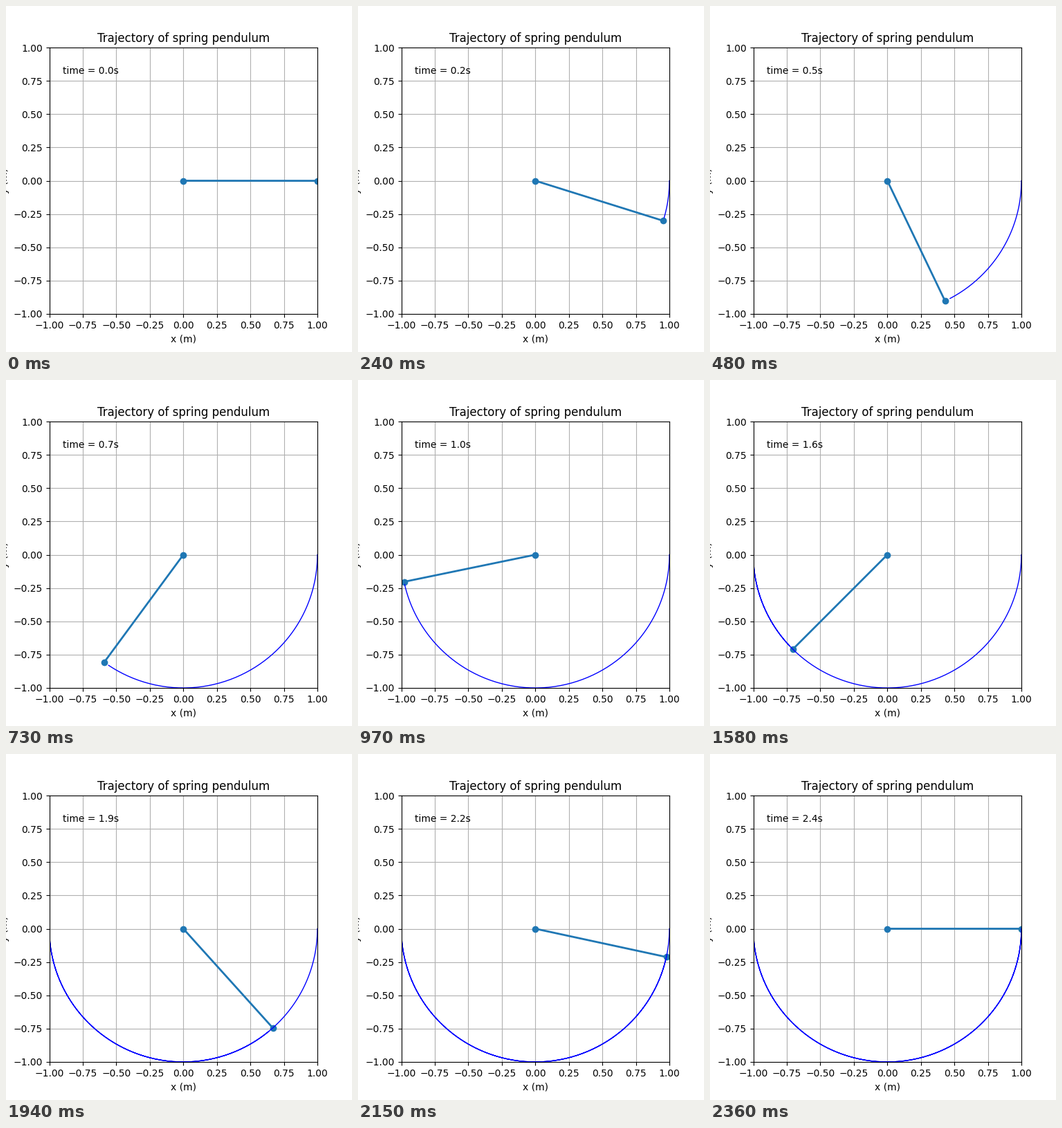
Animation, 500 px wide and 500 px high, one loop 2.39 s. Source, as a matplotlib script:

```python
import numpy as np
import matplotlib.pyplot as plt
from matplotlib.animation import FuncAnimation

G = 9.8          # gravity, m/s^2
LENGTH = 1.0     # stiff spring, m
DT = 0.01        # simulation step, s
TICKS = 239      # loop length in 10 ms ticks
FPS = 33         # rate at which the picture is refreshed


def rates(state):
    angle, speed = state
    return np.array([speed, -G / LENGTH * np.sin(angle)])


def swing(steps):
    """Angle from the vertical at every step, released from horizontal."""
    state = np.array([np.pi / 2, 0.0])
    angles = [state[0]]
    for _ in range(steps):
        a = rates(state)
        b = rates(state + a * DT / 2)
        c = rates(state + b * DT / 2)
        d = rates(state + c * DT)
        state = state + (a + 2 * b + 2 * c + d) * DT / 6
        angles.append(state[0])
    return np.array(angles)


theta = swing(TICKS + 1)
x = LENGTH * np.sin(theta)
y = -LENGTH * np.cos(theta)

fig, ax = plt.subplots(figsize=(5, 5), dpi=100)
ax.set_xlim(-1, 1)
ax.set_ylim(-1, 1)
ax.set_title("Trajectory of spring pendulum")
ax.set_xlabel("x (m)")
ax.set_ylabel("y (m)")
ax.grid()

rod, = ax.plot([], [], "o-", lw=2)
trail, = ax.plot([], [], "b-", lw=1)
clock = ax.text(0.05, 0.9, "", transform=ax.transAxes)


def update(tick):
    shown = int((tick + 0.5) * FPS / 100)
    step = round(100 * shown / FPS) + 1
    rod.set_data([0, x[step]], [0, y[step]])
    trail.set_data(x[:step], y[:step])
    clock.set_text(f"time = {step * DT:.1f}s")
    return rod, trail, clock


anim = FuncAnimation(fig, update, frames=TICKS, interval=10,
                     repeat=True, repeat_delay=0)
plt.show()
```
